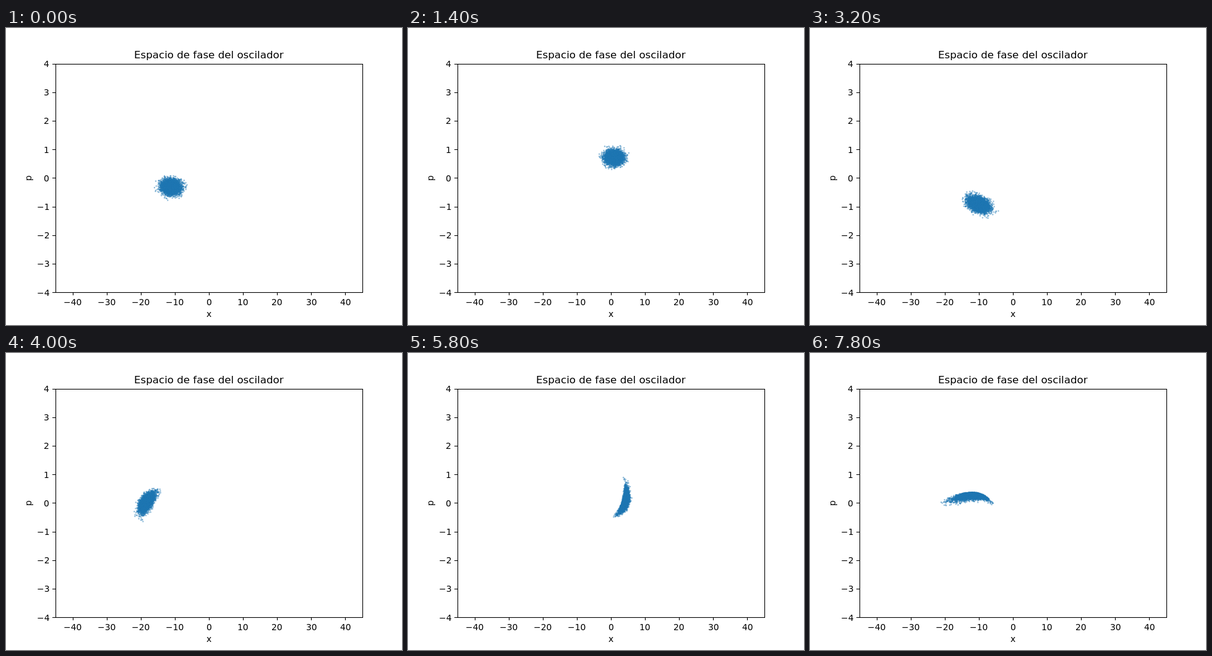
Recreate the animation shown at these times as an HTML page with a canvas. Size 640 px wide and 480 px high, loop 8000 ms.

```html
<!DOCTYPE html>
<html lang="es">
<head>
<meta charset="utf-8">
<title>Espacio de fase del oscilador</title>
<style>
  html, body { margin: 0; width: 100%; height: 100%; overflow: hidden; background: #fff; }
  canvas { display: block; width: 640px; height: 480px; }
</style>
</head>
<body>
<canvas id="plot" width="640" height="480"></canvas>
<script>
const ctx = document.getElementById('plot').getContext('2d');
const STEP = 200, STEPS = 40, COUNT = 5000;
const X0 = -11.1, RATE = 4;
const UNIT_X = 59, UNIT_P = 46.2;
const BOX = { left: 80, right: 576, top: 57.6, bottom: 427.2 };
const px = x => 328 + x * 496 / 90;
const py = p => 242.4 - p * UNIT_P;
const snap = v => Math.round(v) + 0.5;

const linear = f => f;
const cosine = f => (1 - Math.cos(Math.PI * f)) / 2;

// Value at t of a curve through [time, value] points.
function curve(points, t, ease = linear) {
  let i = 0;
  while (i < points.length - 2 && points[i + 1][0] <= t) i++;
  const [[t0, v0], [t1, v1]] = points.slice(i, i + 2);
  const f = Math.min(1, Math.max(0, (t - t0) / (t1 - t0)));
  return v0 + (v1 - v0) * ease(f);
}

// The mean momentum swings between these turning points.
const SWING = [[-6, -1.4], [6, .77], [14.9, -.98], [24.8, .95], [33, -.76], [42, .58]];
const momentum = t => curve(SWING, t, cosine);

// The mean position is the integral of the momentum.
function position(t) {
  let x = X0;
  const dt = 0.1, n = Math.round(t / dt);
  for (let i = 0; i < n; i++) x += RATE * momentum((i + 0.5) * dt) * dt;
  return x;
}

// The cloud turns, lengthens, thins out and bends.
const ANGLE = [[0, 233], [11, 23], [16, -40], [33, -356], [39, -358]];
const LENGTH = [[7, .12], [11, .17], [16, .158], [25, .2], [39, .21]];
const WIDTH = [[0, .126], [16, .104], [25, .032], [39, .052]];
const BEND = [[16, 0], [25, .014], [33, .014], [39, -.027]];
const FOLD = [[25, 0], [33, .12]];

let seed = 20417;
function random() {
  seed = (Math.imul(seed, 1664525) + 1013904223) >>> 0;
  return (seed + 1) / 4294967297;
}
const cloud = Array.from({ length: COUNT }, () => {
  const r = Math.sqrt(-2 * Math.log(random())), a = 2 * Math.PI * random();
  return [r * Math.cos(a), r * Math.sin(a)];
});

function drawCloud(t) {
  const angle = curve(ANGLE, t) * Math.PI / 180;
  const c = Math.cos(angle), s = Math.sin(angle);
  const length = curve(LENGTH, t), width = curve(WIDTH, t);
  const bend = curve(BEND, t), fold = curve(FOLD, t);
  const cx = px(position(t)), cy = py(momentum(t));
  ctx.fillStyle = 'rgba(31,119,180,0.5)';
  for (const [u, v] of cloud) {
    const q = u * u - 1;
    const along = length * (u + 2.5 * bend * q);
    const across = width * (v - fold * (v * v - 1)) * (1 - fold * u) + bend * q;
    ctx.beginPath();
    ctx.arc(cx + UNIT_X * (along * c - across * s), cy - UNIT_P * (along * s + across * c), 1.2, 0, 7);
    ctx.fill();
  }
}

function line(x1, y1, x2, y2) {
  ctx.beginPath();
  ctx.moveTo(x1, y1);
  ctx.lineTo(x2, y2);
  ctx.stroke();
}

// anchor: 0.5 centres the text on x, 1 ends it there.
function text(str, x, y, anchor = 0.5, size = 13.89) {
  ctx.font = size + 'px "DejaVu Sans", sans-serif';
  ctx.fillText(str, Math.round(x - ctx.measureText(str).width * anchor), Math.round(y));
}

function drawAxes() {
  ctx.strokeStyle = ctx.fillStyle = '#000';
  ctx.lineWidth = 1.1;
  const label = n => String(n).replace('-', '\u2212');
  for (let n = -40; n <= 40; n += 10) {
    const x = snap(px(n));
    line(x, 428, x, 432);
    text(label(n), px(n), 448);
  }
  for (let n = -4; n <= 4; n++) {
    const y = snap(py(n));
    line(75, y, 80, y);
    text(label(n), 70.3, py(n) + 5.3, 1);
  }
  const l = snap(BOX.left), t = snap(BOX.top);
  ctx.strokeRect(l, t, snap(BOX.right) - l, snap(BOX.bottom) - t);
  text('Espacio de fase del oscilador', 328, 49, 0.5, 16.67);
  text('x', 328, 467);
  ctx.save();
  ctx.translate(41, 243);
  ctx.rotate(-Math.PI / 2);
  text('p', 0, 0);
  ctx.restore();
}

let shown = -1;
function frame() {
  const step = Math.floor(performance.now() / STEP) % STEPS;
  if (step !== shown) {
    shown = step;
    ctx.fillStyle = '#fff';
    ctx.fillRect(0, 0, 640, 480);
    drawCloud(step);
    drawAxes();
  }
  requestAnimationFrame(frame);
}
frame();
</script>
</body>
</html>
```
